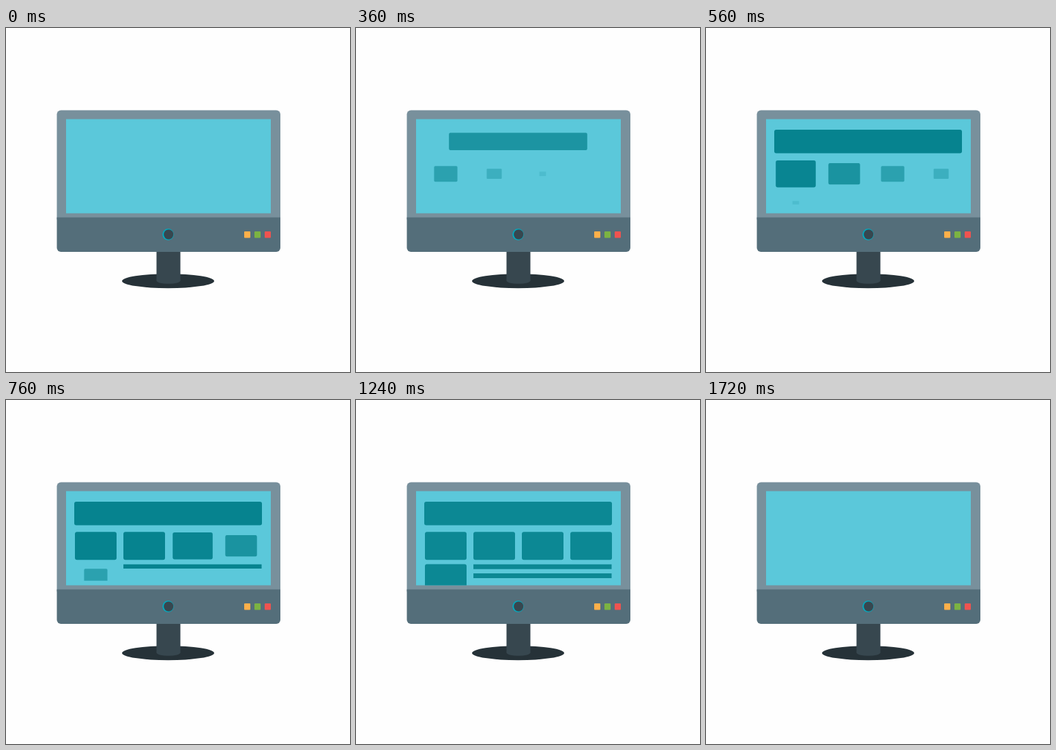
These frames come from a looping animation (504 px wide and 504 px high, 1.76 s). An HTML page with a canvas:

```html
<!DOCTYPE html>
<html lang="en">
<head>
<meta charset="utf-8">
<title>Page layout on a monitor</title>
<style>
  html, body { margin: 0; width: 100%; height: 100%; overflow: hidden; background: #fefefe; }
  canvas { display: block; width: 504px; height: 504px; }
</style>
</head>
<body>
<canvas id="stage" width="504" height="504"></canvas>
<script>
const ctx = document.getElementById('stage').getContext('2d');
const LOOP = 1760, STEP = 40;
const TEAL = '#06838f';

const clamp = v => Math.min(1, Math.max(0, v));
const progress = (t, start, duration) => clamp((t - start) / duration);

function rect(x, y, w, h, color, radius = 0) {
  ctx.fillStyle = color;
  ctx.beginPath();
  ctx.roundRect(x, y, w, h, radius);
  ctx.fill();
}

function ellipse(x, y, rx, ry, color) {
  ctx.fillStyle = color;
  ctx.beginPath();
  ctx.ellipse(x, y, rx, ry, 0, 0, Math.PI * 2);
  ctx.fill();
}

// Block that grows from its centre while fading in.
function block(x, y, w, h, p, fade, radius = 3) {
  if (p <= 0) return;
  ctx.save();
  ctx.globalAlpha = p * fade;
  ctx.translate(x + w / 2, y + h / 2);
  ctx.scale(p, p);
  rect(-w / 2, -h / 2, w, h, TEAL, radius);
  ctx.restore();
}

// Text line that unrolls downwards.
function textLine(y, p, fade) {
  ctx.globalAlpha = fade;
  if (p > 0) rect(172, y, 202.5, 7 * p, TEAL);
  ctx.globalAlpha = 1;
}

function drawMonitor() {
  rect(0, 0, 504, 504, '#fefefe');
  ellipse(237.5, 370.7, 67.5, 10.5, '#263238');
  ellipse(238, 370, 17.5, 4.8, '#37474f');
  rect(220.5, 326, 35, 44, '#37474f');
  rect(74.5, 120.5, 327.5, 160, '#78909c', [6, 6, 0, 0]);
  rect(74.5, 277.5, 327.5, 50.5, '#546e7a', [0, 0, 6, 6]);
  rect(88, 133.5, 300, 138, '#5bc8da');
  ellipse(237.5, 302.5, 8.2, 8.5, '#00acc1');
  ellipse(238.2, 302.5, 7, 7.3, '#37474f');
  ['#ffb04a', '#7cb342', '#ef5350'].forEach((color, i) =>
    rect(349 + i * 15, 298, 9, 9.5, color, 1));
}

function drawPage(t) {
  const fade = 1 - progress(t, 1200, 520);
  block(100, 149, 275, 34.5, progress(t, 80, 380), fade);
  for (let i = 0; i < 4; i++) {
    block(101 + i * 71, 193.2, 61, 41, progress(t, 80 + i * 100, 500), fade);
  }
  block(101, 240.5, 61, 31, progress(t, 480, 500), fade, [3, 3, 0, 0]);
  textLine(240.7, progress(t, 580, 200), fade);
  textLine(254, progress(t, 860, 200), fade);
}

const origin = performance.now();
function frame() {
  const t = (performance.now() - origin) % LOOP;
  drawMonitor();
  drawPage(Math.floor(t / STEP) * STEP);
  requestAnimationFrame(frame);
}
frame();
</script>
</body>
</html>
```
